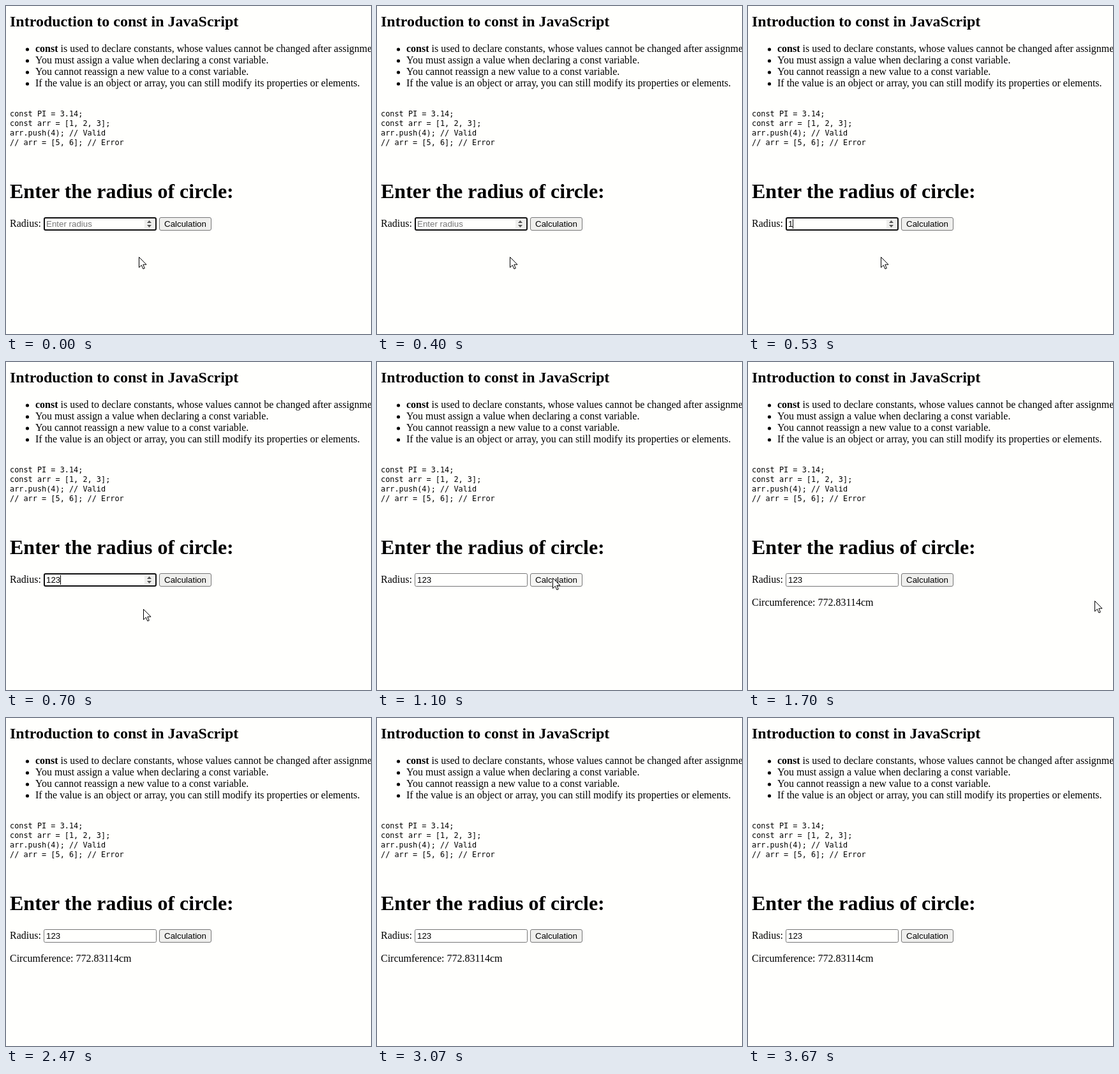
Write an HTML page that moves like this. It is 572 px wide and 514 px high and loops after 3710 ms.

```html
<!DOCTYPE html>
<html lang="en">
<head>
<meta charset="utf-8">
<title>Introduction to const</title>
<style>
html, body { margin: 0; width: 100%; height: 100%; overflow: hidden; background: #fffffd; }
svg { display: block; }
text { fill: #000; white-space: pre; }
.serif { font: 16px "Liberation Serif", "Times New Roman", serif; }
.h1 { font-size: 32px; font-weight: bold; }
.h2 { font-size: 24px; font-weight: bold; }
.bold { font-weight: bold; }
.code { font: 11.88px "DejaVu Sans Mono", "Noto Sans Mono", monospace; }
.ui { font: 13.333px "Liberation Sans", Arial, sans-serif; }
</style>
</head>
<body>
<svg width="572" height="514" viewBox="0 0 572 514">
  <rect width="572" height="514" fill="#fffffd"/>
  <g class="serif">
    <text class="h2" x="6" y="32">Introduction to const in JavaScript</text>
    <text x="46" y="72"><tspan class="bold">const</tspan> is used to declare constants, whose values cannot be changed after assignment.</text>
    <text x="46" y="90">You must assign a value when declaring a const variable.</text>
    <text x="46" y="108">You cannot reassign a new value to a const variable.</text>
    <text x="46" y="126">If the value is an object or array, you can still modify its properties or elements.</text>
    <text class="h1" x="6" y="301">Enter the radius of circle:</text>
    <text x="6" y="346">Radius:</text>
    <text id="result" x="6" y="382"></text>
  </g>
  <g>
    <circle cx="33.5" cy="68" r="2.6"/>
    <circle cx="33.5" cy="86" r="2.6"/>
    <circle cx="33.5" cy="104" r="2.6"/>
    <circle cx="33.5" cy="122" r="2.6"/>
  </g>
  <g class="code">
    <text x="6" y="173">const PI = 3.14;</text>
    <text x="6" y="188">const arr = [1, 2, 3];</text>
    <text x="6" y="203">arr.push(4); // Valid</text>
    <text x="6" y="218">// arr = [5, 6]; // Error</text>
  </g>
  <g class="ui">
    <rect id="blurBox" x="59.5" y="331.5" width="176" height="20" rx="2" fill="#fffffd" stroke="#767676"/>
    <g id="focusBox">
      <rect x="60" y="332" width="175" height="19" rx="2" fill="#fffffd" stroke="#101010" stroke-width="2"/>
      <rect x="217" y="334" width="15" height="15" fill="#efefed"/>
      <path d="M221 340L224.5 336L228 340ZM221 343L224.5 347L228 343Z" fill="#505050"/>
    </g>
    <text id="value" x="63" y="346"></text>
    <rect id="caret" y="334" width="1" height="15"/>
    <rect id="button" x="240.5" y="331.5" width="81" height="20" rx="2.5" stroke="#767676"/>
    <text x="248" y="346">Calculation</text>
  </g>
  <path id="cursor" d="M.5 .5V16.8L4.3 13.2L6.9 19L9.3 18L6.8 12.2H12Z" fill="#fff" stroke="#000" stroke-linejoin="round"/>
</svg>
<script>
const LOOP = 3710, FPS = 30;
const KEYS = [470, 550, 630];
const PRESS = 1050, RELEASE = 1170, EXIT = 1745;
const ENTRY = "123";
// time, x, y of the pointer tip
const PATH = [
  [0, 208, 393], [600, 208, 393], [700, 215, 387], [850, 241, 366], [1000, 275, 338],
  [1180, 275, 338], [1340, 322, 374], [1490, 383, 395], [1600, 454, 392],
  [1700, 543, 374], [EXIT, 583, 366]
];
const $ = id => document.getElementById(id);
const show = (id, on) => $(id).setAttribute("visibility", on ? "visible" : "hidden");

const step = t => Math.floor((t + 4) * FPS / 1000) * 1000 / FPS;

function pointer(t) {
  const i = PATH.findIndex(p => p[0] > t);
  if (i < 0) return PATH[PATH.length - 1].slice(1);
  const [t0, x0, y0] = PATH[i - 1], [t1, x1, y1] = PATH[i];
  const k = (t - t0) / (t1 - t0);
  return [Math.round(x0 + (x1 - x0) * k), Math.round(y0 + (y1 - y0) * k)];
}

function draw(t) {
  const typed = KEYS.filter(k => t >= k).length;
  const focused = t < PRESS;
  const [x, y] = pointer(t);
  const hover = x >= 240 && x < 322 && y >= 331 && y < 352;
  const pressed = t >= PRESS && t < RELEASE;

  $("value").textContent = typed ? ENTRY.slice(0, typed) : "Enter radius";
  $("value").style.fill = typed ? "#000" : "#757575";
  $("caret").setAttribute("x", Math.round(63 + typed * 7.41));
  show("caret", focused && typed > 0);
  show("focusBox", focused);
  show("blurBox", !focused);
  $("button").setAttribute("fill", pressed ? "#f5f5f3" : hover ? "#e5e5e3" : "#efefed");
  $("result").textContent = t >= RELEASE
    ? "Circumference: " + (2 * 3.14159 * ENTRY).toFixed(5) + "cm" : "";
  $("cursor").setAttribute("transform", `translate(${x} ${y})`);
  show("cursor", t < EXIT);
}

const start = performance.now();
function tick() {
  draw(step((performance.now() - start) % LOOP));
  requestAnimationFrame(tick);
}
tick();
</script>
</body>
</html>
```
